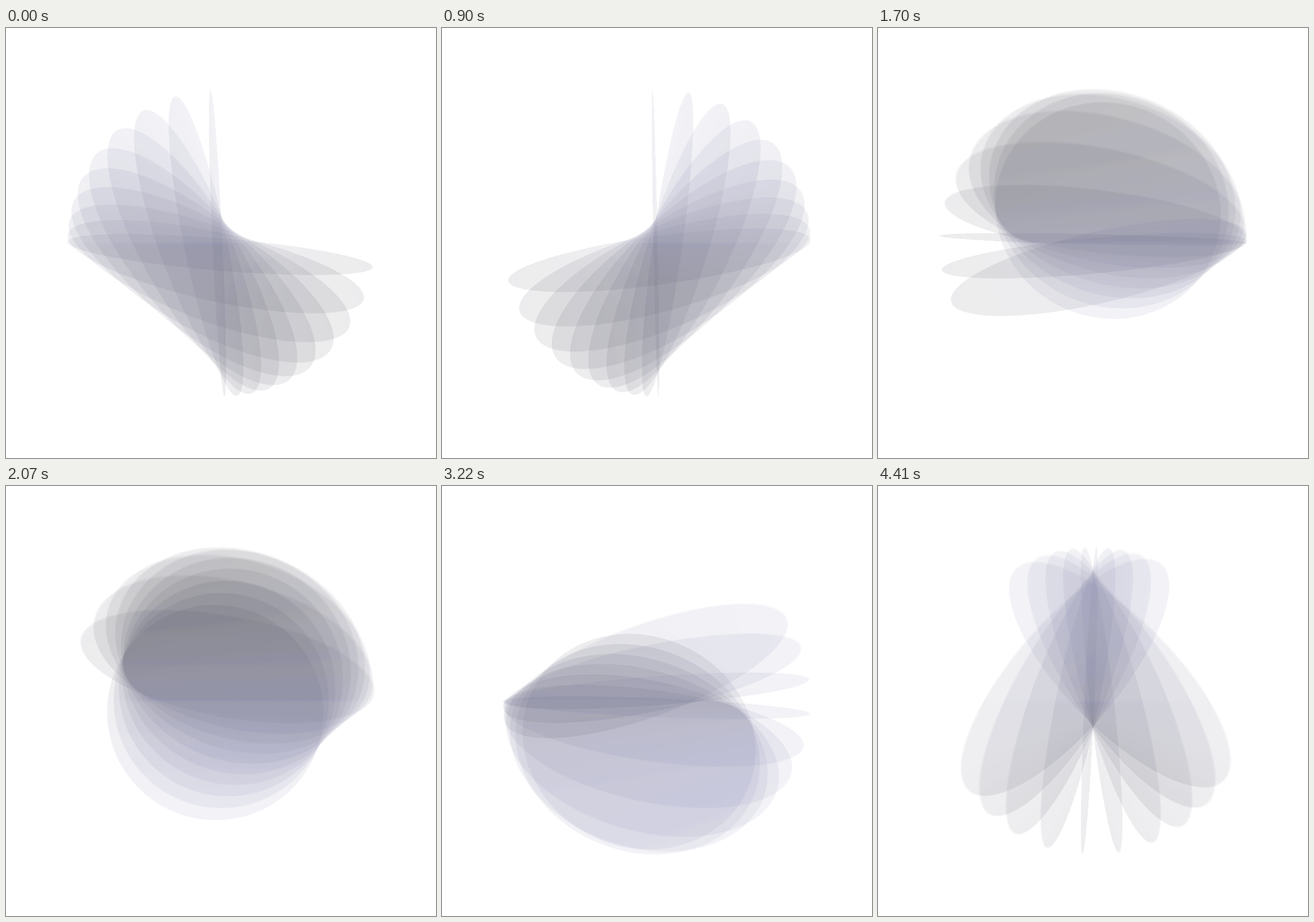
An HTML page that plays this animation: 748 by 748 pixels, repeating every 4.44 s.

```html
<!DOCTYPE html>
<html lang="en">
<head>
<meta charset="utf-8">
<title>Turning discs</title>
<style>
  html, body {
    margin: 0;
    width: 100%;
    height: 100%;
    overflow: hidden;
    background: #fff;
  }
  #stage {
    position: relative;
    width: 100%;
    height: 100%;
    overflow: clip;
    contain: strict;
  }
  .disc {
    position: absolute;
    left: 187px;
    top: 187px;
    width: 374px;
    height: 374px;
    border-radius: 50%;
    background: linear-gradient(#7d7daf, #3c3c48);
    opacity: 0.1;
  }
</style>
</head>
<body>
<div id="stage"></div>
<script>
  const LOOP = 4440;      // ms
  const STEPS = 109;      // pictures per loop
  const COUNT = 10;       // discs in the trail
  const PER_DISC = 2.4;   // steps between neighbouring discs
  const START = -0.29;    // phase of the leading disc, in disc units
  const DEPTH = 261.8;    // perspective distance, px

  const stage = document.getElementById('stage');
  const discs = Array.from({ length: COUNT }, () => {
    const el = document.createElement('div');
    el.className = 'disc';
    return stage.appendChild(el);
  });

  function pose(el, q) {
    const turnX = -9 * q;
    const turnY = 90 + 4.5 * q;
    el.style.transform =
      `perspective(${DEPTH}px) rotateY(${turnY}deg) rotateX(${turnX}deg)`;
  }

  function draw(ms) {
    const step = Math.min(STEPS - 1, Math.floor((ms % LOOP) * STEPS / LOOP + 0.3));
    const lead = step / PER_DISC + START;
    discs.forEach((el, i) => pose(el, lead - (COUNT - 1 - i)));
  }

  const begin = performance.now();
  function tick() {
    draw(performance.now() - begin);
    requestAnimationFrame(tick);
  }
  draw(0);
  requestAnimationFrame(tick);
</script>
</body>
</html>
```
